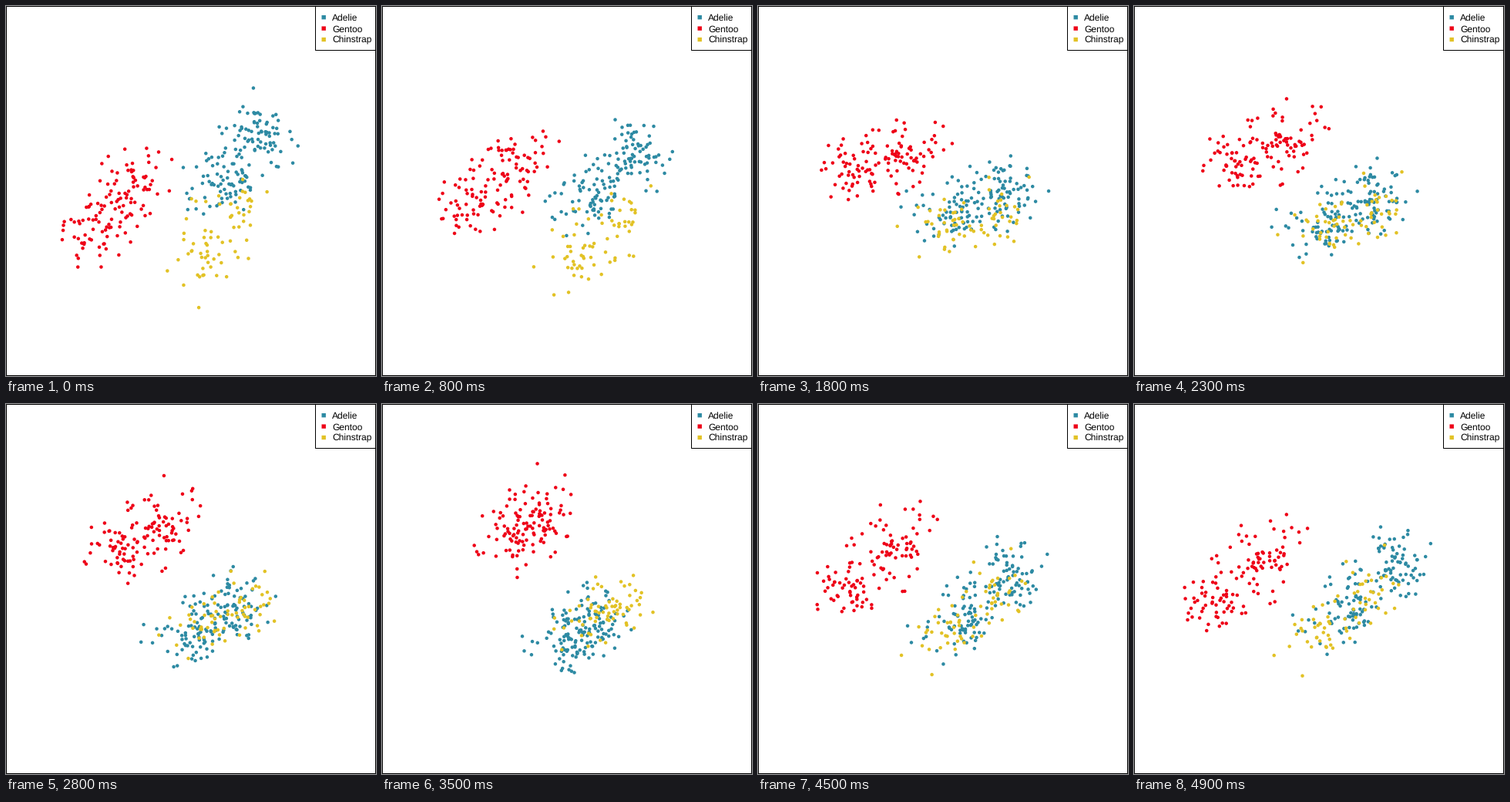
These frames come from a looping animation (480x480 px, 5000 ms). A matplotlib script:

```python
import numpy as np
import matplotlib.pyplot as plt
from matplotlib.animation import FuncAnimation
from matplotlib.patches import Rectangle

SIZE, DPI = 480, 96
PX = 72 / DPI
FRAMES, INTERVAL = 50, 100
SCALE = 58

# Name, colour, count and centre along the two axes that separate the species.
SPECIES = [
    ("Adelie", "#2d8aa3", 151, (0, 0)),
    ("Gentoo", "#ee0017", 123, (1.99, 2.87)),
    ("Chinstrap", "#e2c225", 68, (1.89, 0)),
]
# Body size, mostly male against female, stretches every species the same way.
SIZE_AXIS = np.array([0.42, 0.10, 0.56, 0.15])
NOISE = 0.36

# Stops of the tour: frame, horizontal direction, vertical direction.
STOPS = [
    (0, (-0.27, -0.80, -0.34, 0.41), (-0.92, 0.26, -0.15, -0.24)),
    (18, (-0.11, -0.69, -0.72, 0.03), (-0.23, 0.48, -0.40, 0.75)),
    (35, (0.30, -0.63, -0.48, -0.54), (0.24, 0.66, -0.71, 0.00)),
    (49, (-0.34, -0.78, -0.39, -0.35), (-0.32, 0.29, -0.75, 0.51)),
]


def sample_group(rng, count, centre):
    """Two sexes of one species in four dimensions, without far outliers."""
    sex = np.where(np.arange(count) % 2, 1, -1)
    size = sex + 0.4 * rng.standard_normal(count)
    points = np.outer(size, SIZE_AXIS)
    points += NOISE * np.clip(rng.standard_normal((count, 4)), -2.2, 2.2)
    return points - points.mean(axis=0) + (*centre, 0, 0)


def plane_at(frame):
    """Blend neighbouring stops and make the plane orthonormal again."""
    i = max(k for k, stop in enumerate(STOPS[:-1]) if stop[0] <= frame)
    (start, *a), (end, *b) = STOPS[i:i + 2]
    u = (frame - start) / (end - start)
    blend = (1 - u) * np.array(a) + u * np.array(b)
    left, _, right = np.linalg.svd(blend, full_matrices=False)
    return left @ right


def box(x, y, width, height, **style):
    ax.add_patch(Rectangle((x, y), width, height, snap=False, **style))


rng = np.random.default_rng(4)
data = np.vstack([sample_group(rng, count, centre)
                  for _, _, count, centre in SPECIES])
data -= data.mean(axis=0)
colors = [color for _, color, count, _ in SPECIES for _ in range(count)]

plt.rcParams["text.hinting"] = "none"
fig = plt.figure(figsize=(SIZE / DPI, SIZE / DPI), dpi=DPI, facecolor="white")
ax = fig.add_axes([0, 0, 1, 1])
ax.set(xlim=(0, SIZE), ylim=(SIZE, 0))
ax.axis("off")

line = dict(facecolor="white", edgecolor="black", linewidth=PX)
box(0.5, 0.5, SIZE - 1, SIZE - 1, zorder=0, **line)
box(401.5, 0.5, SIZE - 402, 57, zorder=3, **line)
for row, (name, color, _, _) in enumerate(SPECIES):
    y = 14.7 + 14.4 * row
    box(409.5, y - 2.7, 5.4, 5.4, color=color, linewidth=0, zorder=4)
    ax.text(423, y + 4.3, name, family="Liberation Sans", fontsize=12 * PX,
            va="baseline", zorder=4)

dots = ax.scatter(*np.zeros((2, len(data))), s=(4.5 * PX) ** 2,
                  c=colors, linewidths=0, zorder=2)


def update(frame):
    x, y = SCALE * plane_at(frame) @ data.T
    dots.set_offsets(np.column_stack([SIZE / 2 + x, SIZE / 2 - y]))
    return (dots,)


anim = FuncAnimation(fig, update, frames=FRAMES, interval=INTERVAL,
                     repeat=True, repeat_delay=0)
plt.show()
```
